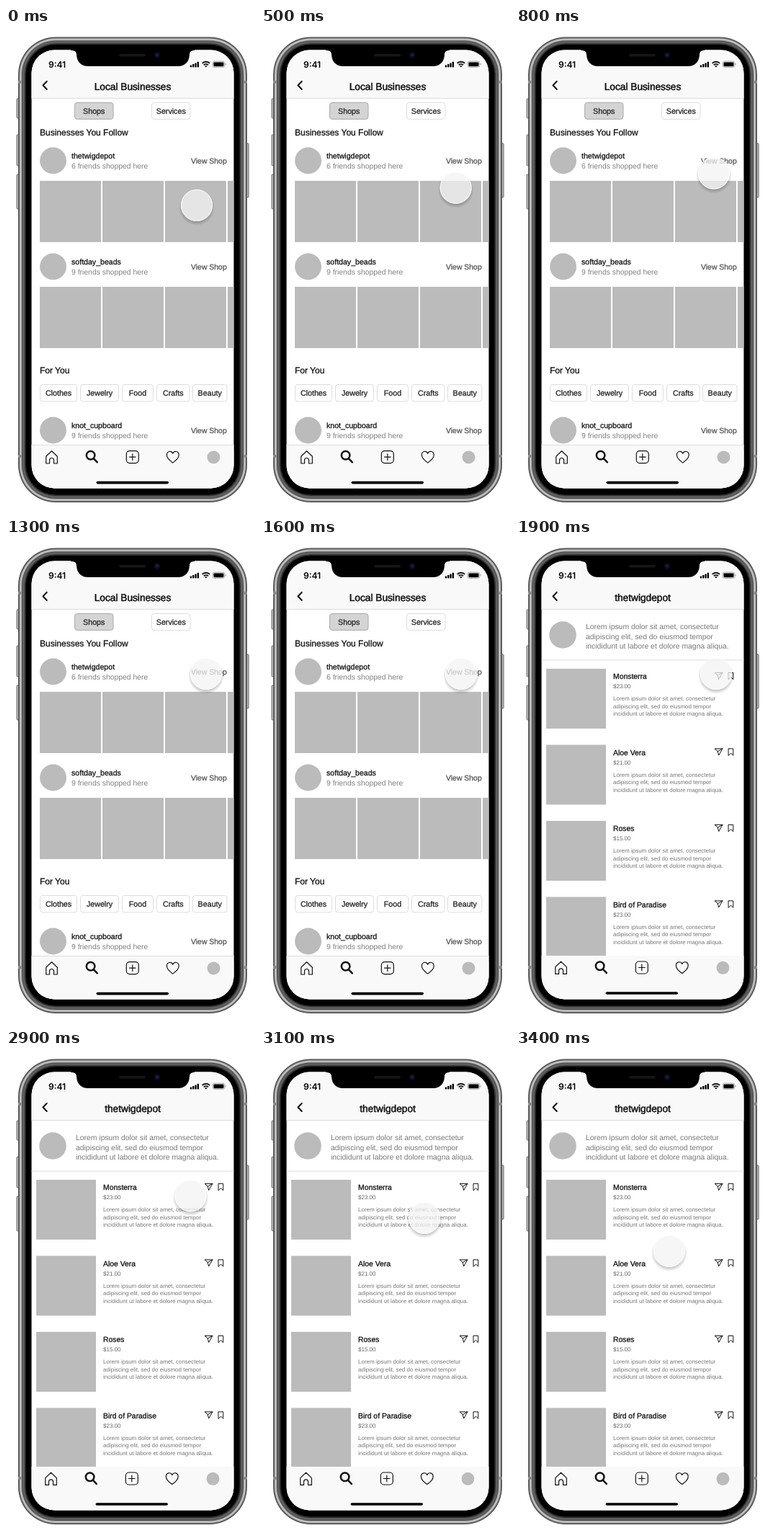
An HTML page that plays this animation: 346x670 px, repeating every 3500 ms.

```html
<!DOCTYPE html>
<html lang="en">
<head>
<meta charset="utf-8">
<title>Shop browsing</title>
<style>
html, body { margin: 0; width: 100%; height: 100%; overflow: hidden; background: #fff; }
svg { display: block; width: 346px; height: 670px; }
text { font-family: "Liberation Sans", Arial, sans-serif; text-rendering: geometricPrecision; }
.medium { stroke: currentColor; stroke-width: .28px; }
.title { stroke: currentColor; stroke-width: .5px; }
.line { fill: none; stroke: #111; stroke-width: 1.2; stroke-linejoin: round; stroke-linecap: round; }
</style>
</head>
<body>
<svg id="stage" viewBox="0 0 346 670"></svg>
<script>
const GREY = '#bbb';
const rect = (x, y, w, h, r, fill, stroke = 'none', sw = 1) =>
  `<rect x="${x}" y="${y}" width="${w}" height="${h}" rx="${r}" fill="${fill}" stroke="${stroke}" stroke-width="${sw}"/>`;
const disc = (x, y, r, fill = GREY) => `<circle cx="${x}" cy="${y}" r="${r}" fill="${fill}"/>`;
const line = (d, width = 1.2) => `<path class="line" d="${d}" style="stroke-width:${width}"/>`;
const text = (s, x, y, size, color = '#111', weight = 'medium', anchor = 'start') =>
  `<text class="${weight}" x="${x}" y="${y}" font-size="${size}" fill="${color}" color="${color}" text-anchor="${anchor}">${s}</text>`;
const chip = (s, x, w, y, h, fill = '#fff', stroke = '#ddd') =>
  rect(x, y, w, h, 3.5, fill, stroke) + text(s, x + w / 2, y + h / 2 + 3.8, 10.7, '#222', 'medium', 'middle');
const paragraph = (x, y, size, gap, color) =>
  ['Lorem ipsum dolor sit amet, consectetur', 'adipiscing elit, sed do eiusmod tempor', 'incididunt ut labore et dolore magna aliqua.']
    .map((s, i) => text(s, x, y + i * gap, size, color, 'plain')).join('');

function header(title) {
  return rect(35, 30, 282, 67.5, 0, '#f9f9f9') + rect(35, 97, 282, 1, 0, '#ddd') +
    line('M56.7 74L51.4 79.5L56.7 85', 2) +
    text(title, 176, 86.3, 13.7, '#111', 'title', 'middle');
}

function tabBar() {
  return line('M55.7 594.2L63.5 586.8L71.3 594.2V604H66.5V599.5A3 3 0 0 0 60.5 599.5V604H55.7Z') +
    line('M111.8 592.8A5.8 5.8 0 0 1 123.4 592.8A5.8 5.8 0 0 1 111.8 592.8M122 597.4L126.8 602.4', 2.5) +
    rect(167.3, 586.6, 17, 17, 4.5, 'none', '#111', 1.2) + line('M175.8 590.8V599.4M171.5 595.1H180.1') +
    line('M231.8 603.2C227 599.3 223.4 596.6 223.4 592.3C223.4 586.8 229.8 585.7 231.8 590.2C233.8 585.7 240.2 586.8 240.2 592.3C240.2 596.6 236.6 599.3 231.8 603.2Z') +
    disc(288.5, 595.4, 9) + rect(125.5, 628.8, 100.5, 3.6, 1.8, '#000');
}

function shopRow(name, friends, y) {
  const tiles = [0, 1, 2, 3].map(i => rect(47 + i * 87, y + 28, 85, 85, 0, GREY)).join('');
  return disc(65.5, y, 18.5) + text(name, 91, y - 3, 10.6) +
    text(friends + ' friends shopped here', 91, y + 10.6, 10.4, '#808080', 'plain') +
    text('View Shop', 257, y + 4, 10.45, '#555') + tiles;
}

function product(name, price, i) {
  const y = 180 + i * 105.5;
  return rect(42, y, 83, 83, 0, GREY) + text(name, 135, y + 14.2, 10.4) +
    text(price, 135, y + 27, 8, '#666', 'plain') + paragraph(135, y + 44.2, 8, 10.4, '#777') +
    `<g transform="translate(0 ${y})">` +
    line('M276.4 5.4H287L281.7 14.6L280.3 9.2ZM280.3 9.2L287 5.4', 1) +
    line('M295.4 5.4H301.8V14.8L298.6 11.5L295.4 14.8Z', 1) + '</g>';
}

const shop = 'thetwigdepot';
const barFill = rect(30, 578, 292, 64, 0, '#f9f9f9');
const listPage = shopRow(shop, 6, 184) + shopRow('softday_beads', 9, 331) + shopRow('knot_cupboard', 9, 558) +
  header('Local Businesses') +
  chip('Shops', 95.5, 53.5, 103.5, 23, '#d4d4d4', '#aaa') + chip('Services', 202.5, 53.5, 103.5, 23) +
  text('Businesses You Follow', 47, 149, 12) + text('For You', 47, 479.2, 12) +
  [['Clothes', 47.5, 51], ['Jewelry', 103.5, 53], ['Food', 161.5, 43], ['Crafts', 209.5, 45.5], ['Beauty', 259.5, 47.5]]
    .map(([s, x, w]) => chip(s, x, w, 494.5, 23.5)).join('') +
  barFill + rect(30, 578, 292, 1, 0, '#ddd') + tabBar();

const shopPage = header(shop) + disc(65, 133, 18.8) + paragraph(97, 125.2, 10.4, 13.5, '#777') +
  rect(35, 167.5, 282, 1, 0, '#ddd') +
  [['Monsterra', '$23.00'], ['Aloe Vera', '$21.00'], ['Roses', '$15.00'], ['Bird of Paradise', '$23.00']]
    .map(([n, p], i) => product(n, p, i)).join('') +
  barFill + `<g transform="translate(-1 -.6)">${tabBar()}</g>`;

const status = '<text x="59" y="54.6" font-size="12" font-weight="600" style="font-family:Inter,sans-serif">9:41</text>' +
  [3, 4.4, 6, 7.6].map((h, i) => rect(255.8 + i * 3.3, 54.4 - h, 2.3, h, .6, '#000')).join('') +
  `<g fill="none" stroke="#000" stroke-width="1.7"><path d="M272.6 49A7.6 7.6 0 0 1 283.2 49M274.8 51.3A4.5 4.5 0 0 1 281 51.3"/></g>` +
  '<path d="M276.2 52.8A2.6 2.6 0 0 1 279.6 52.8L277.9 54.6Z"/>' +
  rect(287.3, 46.2, 16.4, 8.2, 2.2, 'none', '#999', .8) + rect(288.5, 47.4, 14, 5.8, 1.2, '#000') + rect(304.6, 49, 1, 2.6, .5, '#999');

// Polished rim: nested outlines, one pixel apart, from the edge to the black bezel.
const rim = ['#444', '#777', '#aaa', '#d4d4d4', '#999', '#555', '#5a5a5a', '#666', '#505050', '#333', '#181818', '#000']
  .map((c, i) => rect(17 + i, 12.5 + i, 318 - 2 * i, 645.5 - 2 * i, 52 - i, c)).join('');
const body =
  [[14.9, 98, 27], [14.9, 148, 43], [14.9, 203, 48], [333.6, 160, 75]]
    .map(([x, y, h]) => rect(x, y, 3.6, h, 1, '#bbb', '#555', .8)).join('') + rim +
  [73, 592].map(y => rect(17, y, 4, 4, 0, '#888') + rect(331, y, 4, 4, 0, '#888')).join('');

const notch = '<path d="M90 30H262V31C257 31 255.2 33 255 37C254.5 47 248.5 53 239 53H114C104.5 53 98.5 47 98 37C97.8 33 96 31 90 31Z"/>' +
  rect(157, 36, 37, 3.4, 1.7, '#161616') + disc(210, 37.5, 4.2, '#0b0d1c') + disc(210, 37.5, 1.9, '#18204a');

const touch = '<g id="touch"><circle cy="3" r="25" fill="url(#shade)" clip-path="url(#outside)"/>' +
  '<circle r="22" fill="#f3f3f3" fill-opacity=".75"/><circle r="21.6" fill="none" stroke="#fff" stroke-opacity=".85"/></g>';

document.getElementById('stage').innerHTML = `<defs>
  <clipPath id="screen">${rect(35.5, 30.5, 281, 608, 32, '#000')}</clipPath>
  <clipPath id="outside"><path clip-rule="evenodd" d="M-40-40H40V40H-40ZM-22 0A22 22 0 1 0 22 0A22 22 0 1 0-22 0Z"/></clipPath>
  <radialGradient id="shade"><stop offset=".78" stop-opacity=".22"/><stop offset="1" stop-opacity="0"/></radialGradient>
  </defs>${body}<g clip-path="url(#screen)">${rect(35, 30, 282, 609, 0, '#fff')}
  <g id="list">${listPage}</g><g id="shop">${shopPage}</g>${status}</g>${notch}${touch}`;

const part = id => document.getElementById(id);
const [list, detail, finger] = ['list', 'shop', 'touch'].map(part);
const span = (t, from, to) => Math.min(1, Math.max(0, (t - from) / (to - from)));

function position(t) {
  if (t < 400) {
    const p = span(t, 0, 200);
    return [265 + 5 * p, 246 - 21 * p];
  }
  if (t < 2800) {
    const p = 1 - (1 - span(t, 400, 1300) ** 1.6) ** 3;
    return [270 + 8 * p, 225 - 38 * p];
  }
  const p = span(t, 2800, 3400);
  return [278 - 65 * (1 - (1 - p) ** 2.2), 187 + 92 * p];
}

function draw(now) {
  const t = Math.floor((now % 3500) / 100) * 100; // ten pictures a second
  finger.setAttribute('transform', `translate(${position(t)})`);
  list.style.display = t < 1900 ? '' : 'none';
  detail.style.display = t < 1900 ? 'none' : '';
}

let start;
function tick(now) {
  start ??= now;
  draw(now - start);
  requestAnimationFrame(tick);
}
draw(0);
requestAnimationFrame(tick);
</script>
</body>
</html>
```
